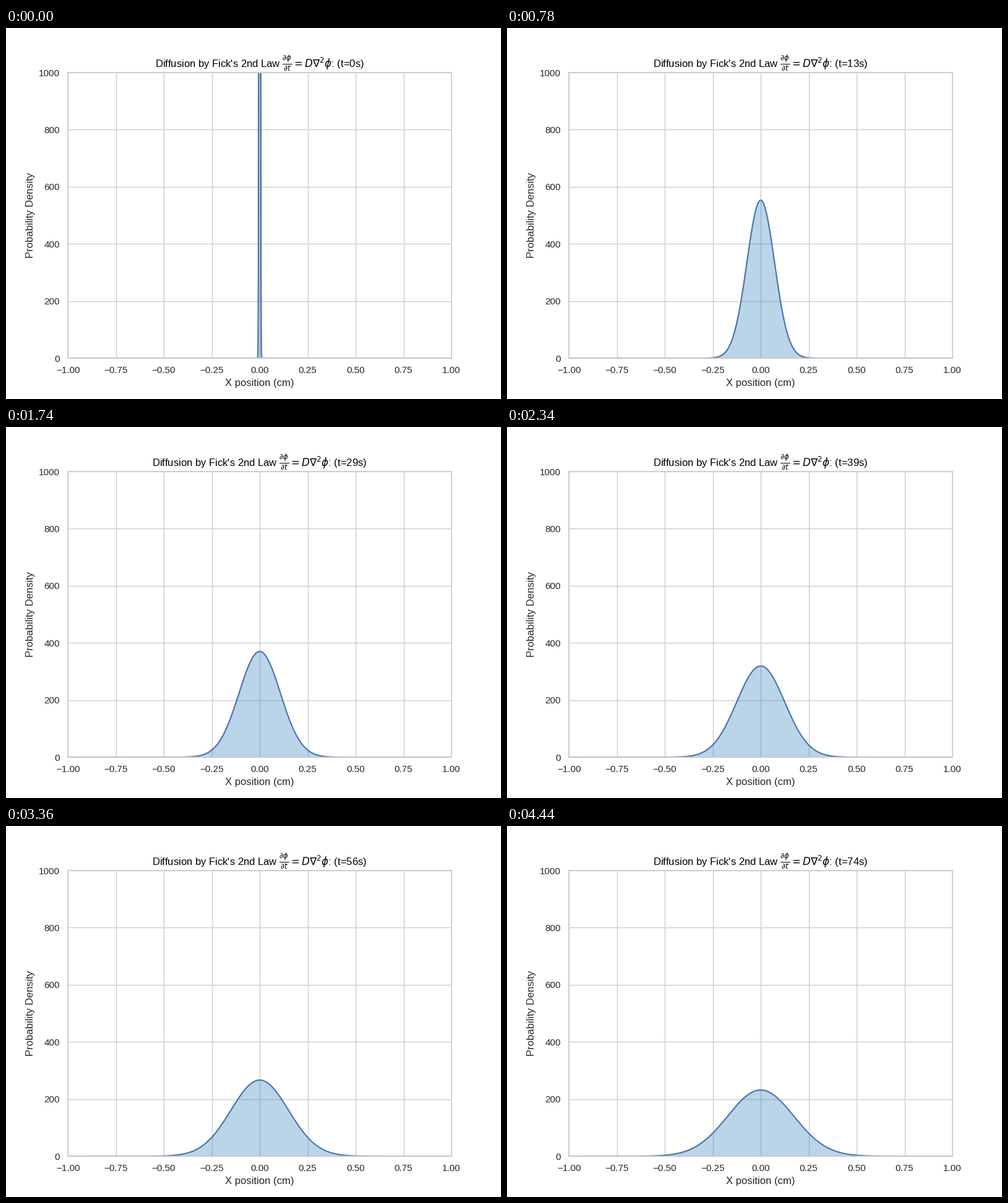
These frames come from a looping animation (800x600 px, 4.5 s). A matplotlib script:

```python
import numpy as np
import matplotlib.pyplot as plt
from matplotlib.animation import FuncAnimation

plt.rcParams.update({
    "font.family": "Liberation Sans",
    "font.size": 12,
    "axes.titlesize": 12,
    "axes.labelsize": 12,
    "xtick.labelsize": 11,
    "ytick.labelsize": 11,
    "text.color": "0.15",
    "axes.labelcolor": "0.15",
    "xtick.color": "0.15",
    "ytick.color": "0.15",
    "axes.edgecolor": "0.8",
    "axes.linewidth": 1.25,
    "axes.grid": True,
    "axes.axisbelow": True,
    "grid.color": "0.8",
    "grid.linewidth": 1,
    "xtick.major.size": 6,
    "ytick.major.size": 6,
    "xtick.bottom": False,
    "ytick.left": False,
    "lines.solid_capstyle": "round",
})

FRAMES = 75
INTERVAL = 60       # ms
D = 2e-4            # diffusion coefficient, cm^2/s
MASS = 100
T_START = 0.015     # stands in for the point source at t = 0

x = np.linspace(-1, 1, 1000)


def density(t):
    spread = 4 * D * max(t, T_START)
    return MASS / np.sqrt(np.pi * spread) * np.exp(-x**2 / spread)


fig, ax = plt.subplots(figsize=(8, 6), dpi=100)
ax.set(xlim=(-1, 1), ylim=(0, 1000),
       xlabel="X position (cm)", ylabel="Probability Density")
title = ax.set_title("", color="black")
curve, = ax.plot([], [], color="#4C72B0", lw=1.5)
area = ax.fill_between(x, 0 * x, color="tab:blue", alpha=0.3, lw=1)


def update(t):
    y = density(t)
    curve.set_data(x, y)
    outline = np.column_stack([x, y])
    area.set_verts([np.vstack([[x[0], 0], outline, [x[-1], 0]])])
    title.set_text(
        r"Diffusion by Fick's 2nd Law "
        r"$\frac{\partial\phi}{\partial t}=D\nabla^2\phi$"
        f": (t={t}s)")
    return curve, area, title


anim = FuncAnimation(fig, update, frames=FRAMES, interval=INTERVAL,
                     repeat=True, repeat_delay=0, blit=False)
plt.show()
```
